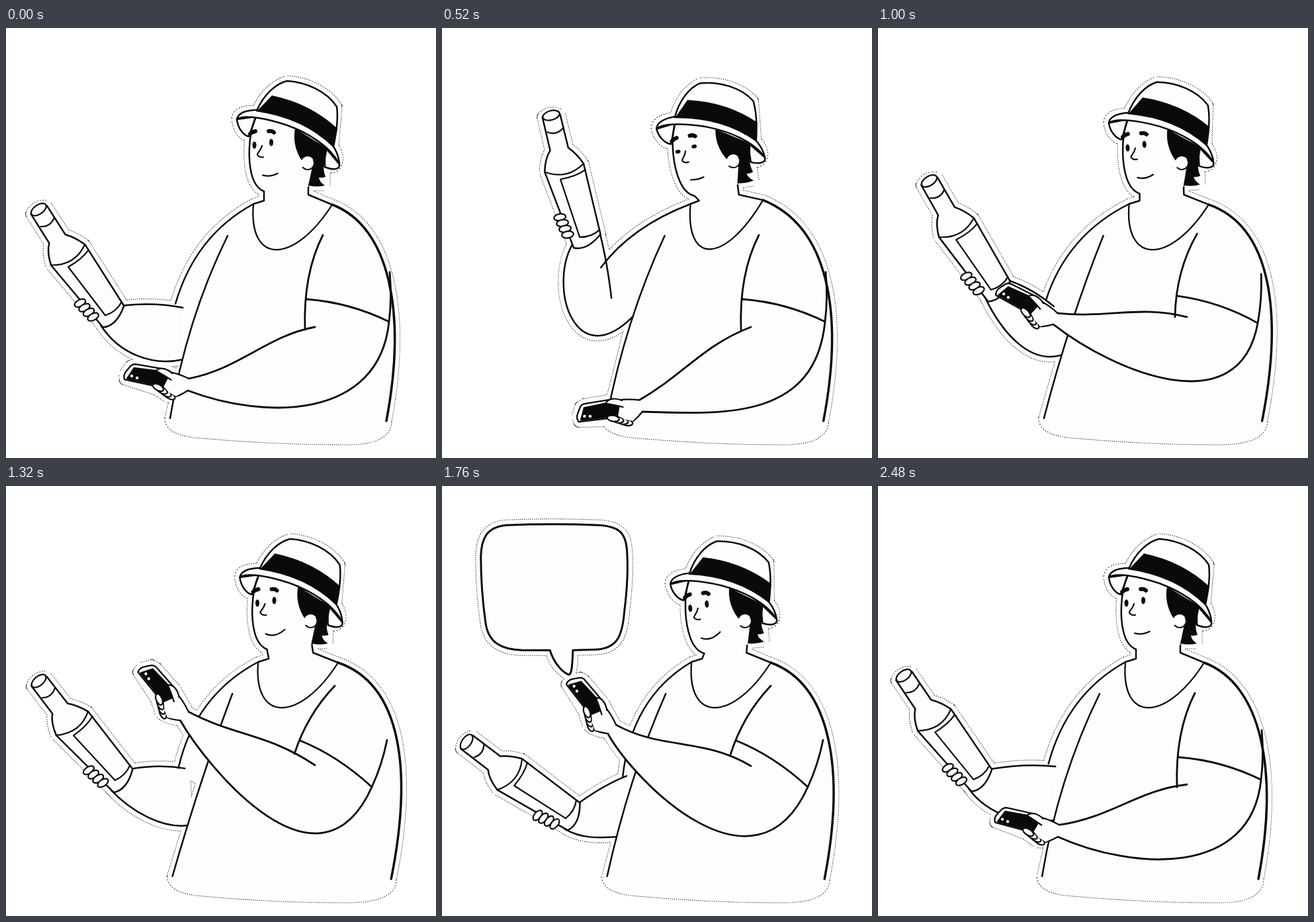
An HTML page with a canvas for the animation above (2.52 s loop, 650 px wide and 650 px high).

```html
<!DOCTYPE html>
<html lang="en">
<head>
<meta charset="utf-8">
<title>Scanning a bottle</title>
<style>
html, body { margin: 0; width: 100%; height: 100%; overflow: hidden; background: #fff; }
canvas { display: block; }
</style>
</head>
<body>
<canvas id="stage" width="650" height="650"></canvas>
<script>
const ctx = document.getElementById('stage').getContext('2d');
const LOOP = 2520, STEP = 40, INK = '#0a0a0a', PAPER = '#fdfdfd';
const EAR = [456, 204], GRIP = [167, 26], BUBBLE_TIP = [191, 285, 0];

// Only the two held objects and the posture are keyed; limbs and face follow them.
// phone and bottle: x, y, degrees. body: sideways sway, head tilt in degrees.
const poses = [
  { t: 0, phone: [214, 526, 11], bottle: [122, 427, 55.7], body: [0, 0] },
  { t: 520, phone: [238, 579, -8], bottle: [184, 300, 74.7], body: [2, -9] },
  { t: 1000, phone: [213, 409, 28], bottle: [143, 387, 58.3], body: [7, -3] },
  { t: 1320, phone: [230, 299, 50], bottle: [136, 440, 50.4], body: [9, 0] },
  { t: 1760, phone: [218, 318, 51], bottle: [158, 505, 35.5], body: [4, -5.5] },
  { t: 2080, phone: [210, 323, 40], bottle: [158, 509, 32.5], body: [3, -4] },
  { t: 2240, phone: [208, 395, 28], bottle: [134, 490, 39], body: [1, -2] },
  { t: 2480, phone: [212, 505, 14], bottle: [116, 437, 54], body: [0, 0] }
];

// Periodic monotone cubic interpolation between poses.
function sample(part, t) {
  const n = poses.length;
  const at = i => {
    const turn = Math.floor(i / n), pose = poses[i - turn * n];
    return { t: pose.t + turn * LOOP, v: pose[part] };
  };
  let i = n - 1;
  while (poses[i].t > t) i--;
  const [p, a, b, q] = [at(i - 1), at(i), at(i + 1), at(i + 2)];
  const h = b.t - a.t, u = (t - a.t) / h;
  const slope = (r, s, k) => (s.v[k] - r.v[k]) / (s.t - r.t);
  const tangent = (m, n) => m * n <= 0 ? 0 : 2 * m * n / (m + n);
  return a.v.map((v, k) => {
    const mid = slope(a, b, k), d = b.v[k] - v;
    const ma = tangent(slope(p, a, k), mid) * h, mb = tangent(mid, slope(b, q, k)) * h;
    return v + u * (ma + u * (3 * d - 2 * ma - mb + u * (ma + mb - 2 * d)));
  });
}

const rad = deg => deg * Math.PI / 180;
const clamp = x => Math.min(1, Math.max(0, x));
const mix = (a, b, u) => a.map((v, k) => v + (b[k] - v) * u);
const shift = ([x, y], dx, dy) => [x + dx, y + dy];
const polar = ([x, y], r, deg) => [x + r * Math.cos(rad(deg)), y + r * Math.sin(rad(deg))];
const quad = (a, c, b, u) => mix(mix(a, c, u), mix(c, b, u), u);
const path = d => new Path2D(d);

function place([x, y, deg], px, py) {
  const c = Math.cos(rad(deg)), s = Math.sin(rad(deg));
  return [x + px * c - py * s, y + px * s + py * c];
}

function within([x, y, deg], draw) {
  ctx.save();
  ctx.translate(x, y);
  ctx.rotate(rad(deg));
  draw();
  ctx.restore();
}

function line(p, width = 2.5) {
  ctx.strokeStyle = INK;
  ctx.lineWidth = width;
  ctx.stroke(p);
}

function fill(p, color) {
  ctx.fillStyle = color;
  ctx.fill(p);
}

function shape(p, width) {
  fill(p, PAPER);
  line(p, width);
}

function oval(x, y, rx, ry, angle = 0) {
  const p = new Path2D();
  p.ellipse(x, y, rx, ry, angle, 0, 7);
  return p;
}

const profile = 'M376 138C366 165 366 200 371 220C375 237 383 244 390 247';
const art = {
  face: path(profile),
  faceFill: path(profile + 'L457 240L470 160Z'),
  hair: path('M437 152C433 172 440 190 447 200L455 196L463 210L457 238Q470 241 482 238Q474 233 473 226Q478 227 483 225Q479 215 481 207L486 182Z'),
  under: path('M349 138C350 150 358 162 367 164L378 134ZM482 180L482 210C496 216 505 213 504 206Z'),
  brim: path('M349 138C352 122 385 120 420 130C465 143 502 172 504 206C490 178 455 158 425 147C395 137 360 130 349 138Z'),
  crown: path('M379 125C390 100 408 84 425 80C455 82 485 96 500 119C503 140 498 165 495 179Q450 135 379 125Z'),
  band: path('M402 102Q460 114 501 152L495 179Q450 135 380 125Z'),
  brows: path('M369 160Q372 157 377 156M397 156Q402 155 405 158'),
  nose: path('M387 178C385 187 377 190 381 193Q384 196 389 195'),
  headEdge: path(profile + 'L457 238L482 238L482 210C500 216 508 200 495 179L500 119C485 96 455 82 425 80Q395 90 379 125Q350 124 349 138Q352 160 367 164Z'),
  bottle: path('M-1 13.5L51 15.5Q60 26 80 32L202 20Q212 2 193 -24.5L83 -28Q66 -22 54 -12L2 -13.5Q-9 0 -1 13.5Z'),
  bottleLines: path('M23 12Q32 0 23 -13M80 32Q101 2 83 -28M93 -28Q99 -12 97 12L189 7Q194 -10 186 -25'),
  phone: path('M-33 12Q-37 6 -33 -1L-28 -10Q-25 -14 -20 -14L24 -15L36 2L24 13Z'),
  phoneBack: path('M-31 10L-23 -9L21 -12L35 2L30 9L20 12L-28 11Z'),
  palm: path('M64 10C56 18 46 25 36 26L20 16L12 -10Q20 -17 30 -12C42 -13 54 -10 62 -8'),
  palmFront: path('M33 -9L62 -6L63 9L48 22L36 18L27 11Z'),
  thumb: path('M36 -1Q24 -6 11 -10C16 -18 28 -16 36 -11'),
  handEdge: path('M-33 12L-35 4L-28 -11L-20 -14L24 -15L62 -8L64 10C56 18 46 25 36 26L16 18Z'),
  bubble: path('M-28 -37C-22 -18 -10 -4 0 0C6 2 6 -20 7 -37L40 -38C74 -39 82 -58 85 -95Q92 -150 89 -190C87 -217 75 -225 48 -227Q-25 -230 -95 -227C-124 -224 -132 -207 -133 -180Q-133 -130 -126 -80C-122 -47 -100 -38 -70 -37Z')
};
const headEdge = new Path2D();
headEdge.addPath(art.headEdge, new DOMMatrix().translate(-EAR[0], -EAR[1]));

function drawHead(pose, sip, smile) {
  within(pose, () => {
    ctx.translate(-EAR[0], -EAR[1]);
    fill(art.faceFill, PAPER);
    shape(art.under);
    line(art.face);
    fill(art.hair, INK);
    fill(oval(...EAR, 10, 10), PAPER);
    const lobe = new Path2D();
    lobe.arc(...EAR, 10, -.5, 2.4);
    line(lobe, 2);
    shape(art.brim);
    shape(art.crown);
    fill(art.band, INK);
    line(art.brows, 6);
    for (const [x, y] of [[375.5, 177], [401, 173]]) fill(oval(x, y, 3 + sip, 5.5 - 2.7 * sip), INK);
    line(art.nose, 2.2);
    line(path(`M388 ${222 + 1.5 * smile}Q${398 + 4 * smile} ${224 + 6 * smile} ${408 + 9 * smile} ${221 - 4 * smile}`), 2.2);
  });
}

function drawBottle(pose) {
  within(pose, () => {
    shape(art.bottle);
    line(art.bottleLines, 2.2);
    shape(oval(0, 0, 7, 13), 2.2);
    for (let i = 0; i < 4; i++) shape(oval(152 + 9.5 * i, 28 - 1.5 * i, 5, 9, .1), 2.2);
  });
}

function drawPhone(pose) {
  within(pose, () => {
    shape(art.palm, 2.3);
    shape(art.phone, 2.3);
    fill(art.phoneBack, INK);
    fill(oval(-23.5, 4.6, 2.2, 2.2), PAPER);
    fill(oval(-15, 6, 2.2, 2.2), PAPER);
    for (let i = 3; i >= 0; i--) shape(oval(19 + 6.5 * i, 14 + 3 * i, 9, 4.5, .3), 2.2);
    fill(art.palmFront, PAPER);
    shape(art.thumb, 2.2);
  });
}

// Cut-out border: a dotted rim left visible around a slightly narrower white one.
function drawSticker(parts) {
  const pass = (width, color, dash) => {
    ctx.strokeStyle = color;
    ctx.setLineDash(dash);
    ctx.lineCap = dash.length ? 'butt' : 'round';
    for (const [p, pose, scale = 1] of parts) within(pose, () => {
      ctx.scale(scale, scale);
      ctx.lineWidth = width / scale;
      ctx.stroke(p);
      if (!dash.length) fill(p, PAPER);
    });
  };
  pass(17, '#222', [1.3, 1.7]);
  pass(15, '#fff', []);
}

// Springs open, settles, then shrinks quickly.
function bubbleScale(t) {
  const age = t - 1420;
  if (age <= 0) return 0;
  const spring = 1 - Math.exp(-age / 71) * Math.cos(Math.PI * age / 150);
  return spring * clamp((2220 - t) / 120);
}

function torsoOf(sway, sip, bend) {
  const lean = .8 * sway;
  const b = {
    neckL: [390 + lean - 3 * sip, 261],
    neckR: [457 + lean - 10 * sip, 252],
    collarL: [374 + lean, 266],
    collarR: [493 + sway - 10 * sip, 267 - 7 * sip],
    sleeveBend: [286, 320 - 20 * bend * bend],
    sleeveEnd: [276 - 36 * bend, 441 - 80 * bend * bend],
    sideTop: [335 + lean, 314],
    sideBend: [273 + 2.4 * sway, 440],
    sideEnd: [248 + .4 * sway, 590],
    backEnd: [575 + lean, 594],
    back1: [580 + 2 * sway, 300],
    back2: [606 + sway, 430]
  };
  b.bowl = `C${b.collarL[0] - 8} 358 ${b.collarR[0] - 58} 358 ${b.collarR}`;
  return b;
}

// The bottle's tilt decides how far this arm is bent.
function bottleArm(bottle, b, bend) {
  const top = place(bottle, 192, -24), low = place(bottle, 197, 21), sq = bend * bend;
  const topEnd = [281 - 25 * bend, 441 - 33 * bend];
  const topBend = shift(mix(top, topEnd, .5), 2, -7);
  const lowEnd = quad(b.sideTop, b.sideBend, b.sideEnd, .8 - .34 * sq);
  const c1 = polar(low, 25 + 50 * bend, 30 + 90 * sq);
  const c2 = shift(lowEnd, -26 - 62 * sq, 2 + 87 * sq * sq);
  return {
    upper: path(`M${top}Q${topBend} ${topEnd}`),
    lower: path(`M${low}C${c1} ${c2} ${lowEnd}`),
    edge: path(`M${top}Q${topBend} ${topEnd}L${lowEnd}C${c2} ${c1} ${low}Z`)
  };
}

// The phone's place and tilt decide the whole arm behind it.
function phoneArm(phone, lift) {
  const [, y, deg] = phone;
  const top = place(phone, 62, -8), low = place(phone, 64, 10);
  const tip = [467, 422 + 30 * clamp((y - 310) / 200)];
  const t1 = polar(top, 78, deg - 22), t2 = shift(tip, -72, .27 * (y - 477));
  const elbow = mix([579, 444], [553, 455], lift), cuff = mix([580, 369], [576, 384], lift);
  const l1 = polar(low, 125 - 42 * lift, deg + 10);
  const l2 = shift(elbow, -15 - 65 * lift, 148 + 29 * lift);
  const pit = mix([479, 313], [497, 302], lift), pitBend = mix([449, 372], [455, 346], lift);
  const pitEnd = [452 - 16 * lift, tip[1] + 4 - 21 * lift];
  const hem = mix([455, 410], [445, 385], lift);
  const hemBend = shift(mix(hem, elbow, .5), 3, -12), cuffBend = shift(mix(elbow, cuff, .5), 4, 2);
  return {
    edge: path(`M${top}C${t1} ${t2} ${tip}L${hem}Q${hemBend} ${elbow}C${l2} ${l1} ${low}Z`),
    lines: path(`M${pit}Q${pitBend} ${pitEnd}M${hem}Q${hemBend} ${elbow}M${top}C${t1} ${t2} ${tip}M${low}C${l1} ${l2} ${elbow}Q${cuffBend} ${cuff}`)
  };
}

function draw(t) {
  const phone = sample('phone', t), hand = sample('bottle', t);
  const [sway, tilt] = sample('body', t);
  const bottle = [...place(hand, -GRIP[0], -GRIP[1]), hand[2]];
  const sip = clamp((hand[2] - 58) / 17), bend = clamp((hand[2] - 32) / 43);
  const lift = clamp((430 - phone[1]) / 110), scale = bubbleScale(t);

  const head = [EAR[0] + .5 * sway - 17 * sip, EAR[1] - 3 * sip, tilt];
  const jaw = place(head, -66, 43), nape = place(head, 1, 30);
  const b = torsoOf(sway, sip, bend);
  const left = bottleArm(bottle, b, bend), right = phoneArm(phone, lift);

  const shoulder = `M${jaw}L${b.neckL}L${b.collarL}Q${b.sleeveBend} ${b.sleeveEnd}`;
  const [fx, fy] = b.sideEnd, [ex, ey] = b.backEnd;
  const torso = path(`${shoulder}L${quad(b.sideTop, b.sideBend, b.sideEnd, .5)}L${b.sideEnd}Q${fx} ${fy + 16} ${fx + 35} ${fy + 21}Q400 622 510 622Q${ex} 623 ${ex} ${ey}C${b.back2} ${b.back1} ${b.collarR}L${b.neckR}L${nape}Z`);

  ctx.fillStyle = '#fff';
  ctx.fillRect(0, 0, 650, 650);
  ctx.lineJoin = 'round';

  const origin = [0, 0, 0];
  const parts = [[torso, origin], [left.edge, origin], [right.edge, origin],
    [headEdge, head], [art.bottle, bottle], [art.handEdge, phone]];
  if (scale > .02) parts.push([art.bubble, BUBBLE_TIP, scale]);
  drawSticker(parts);

  fill(torso, PAPER);
  line(path(shoulder));
  line(path(`M${b.sideTop}Q${b.sideBend} ${b.sideEnd}`));
  line(path(`M${nape}L${b.neckR}L${b.collarR}`));
  line(path(`M${b.collarR}C${b.back1} ${b.back2} ${b.backEnd}`), 3.5);
  line(path(`M${b.collarL}${b.bowl}`), 2.3);
  drawHead(head, sip, .3 + .7 * lift - .3 * sip);

  line(left.upper);
  line(left.lower);
  drawBottle(bottle);

  fill(right.edge, PAPER);
  line(right.lines, 2.8);
  drawPhone(phone);

  if (scale > .02) within(BUBBLE_TIP, () => {
    ctx.scale(scale, scale);
    shape(art.bubble, 3);
  });
}

const start = performance.now();
function tick() {
  const t = (performance.now() - start) % LOOP;
  draw(Math.floor(t / STEP) * STEP);
  requestAnimationFrame(tick);
}
tick();
</script>
</body>
</html>
```
